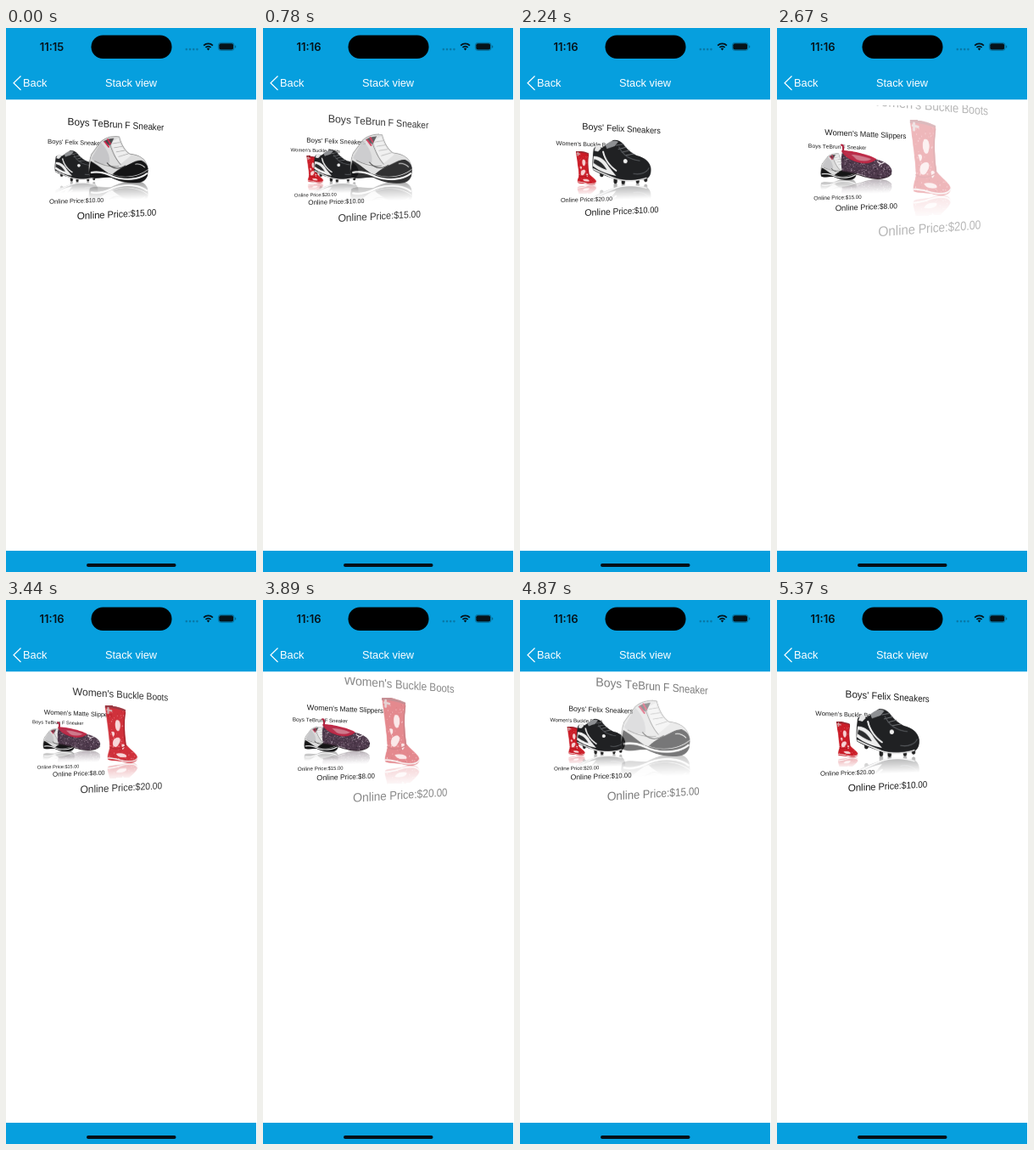
Write an HTML page with a canvas that moves like this. It is 296 px wide and 640 px high and loops after 5.4 s.

```html
<!DOCTYPE html>
<html lang="en">
<head>
<meta charset="utf-8">
<title>Stack view</title>
<style>
  html, body { margin: 0; width: 100%; height: 100%; overflow: hidden; background: #fff; }
  canvas { display: block; width: 296px; height: 640px; }
</style>
</head>
<body>
<canvas id="stage" width="296" height="640"></canvas>
<script>
const W = 296, H = 640, LOOP = 5400;
const BLUE = '#069fde', INK = '#1d1d1d';
const FONT = '"Liberation Sans", Arial, sans-serif';
const ctx = document.getElementById('stage').getContext('2d');

// ---------- product pictures, drawn once on 86-unit squares ----------
const SIZE = 86, RES = 2;

function random(seed) {
  return () => (seed = (seed * 16807) % 2147483647) / 2147483647;
}

function pen(g) {
  return {
    fill(color, d) { g.fillStyle = color; g.fill(new Path2D(d)); },
    line(color, width, d) {
      g.strokeStyle = color; g.lineWidth = width;
      g.lineCap = g.lineJoin = 'round';
      g.stroke(new Path2D(d));
    },
    dots(outline, colors, count, box, seed) {
      const rnd = random(seed);
      g.save();
      g.clip(new Path2D(outline));
      for (let i = 0; i < count; i++) {
        g.fillStyle = colors[i % colors.length];
        g.fillRect(box[0] + rnd() * box[2], box[1] + rnd() * box[3], .5 + rnd(), .5 + rnd());
      }
      g.restore();
    }
  };
}

function drawSlipper({ fill, line, dots }) {
  const body = 'M4 14 C8 20 17 26 31 29 C41 31 50 29 56 24 C67 26 80 31 83 41 C84 49 78 53 68 54 C52 55 40 51 30 47 C20 44 10 45 4 42 C2 34 2 24 4 14Z';
  fill('#b8304d', 'M4 12 C20 12 40 16 57 24 C50 32 38 33 26 30 C14 27 8 21 4 12Z');
  fill('#cf7a8c', 'M18 18 C28 18 40 21 49 24 C43 28 32 28 26 25Z');
  fill('#4b3749', body);
  dots(body, ['#a58da0', '#221a26', '#c9b8c6', '#6d4d66'], 700, [2, 12, 82, 44], 41);
  line('#c02643', 2, 'M4 13 C8 20 17 26 31 29 C42 31 50 29 56 24 C44 18 20 13 4 13');
  line('#b02440', 3, 'M3 4 C6 4 6 9 5 14');
  line('#e9dfe5', 1.6, 'M59 28 L65 31 L70 29 M64 31 L62 34');
  line('#2e2029', 1.4, 'M4 43 C18 44 30 49 42 52 C57 56 75 55 82 47');
}

function drawHighTop({ fill, line }) {
  const body = 'M20 8 C27 2 36 0 44 1 C47 11 51 18 58 22 C69 23 80 26 83 38 C84 47 82 54 74 57 C56 59 44 56 34 51 C24 50 12 54 6 50 C4 42 5 32 8 24Z';
  fill('#dcdcdc', body);
  line('#858585', .7, body);
  fill('#c6c6c8', 'M20 9 C27 16 32 24 31 34 C23 37 13 35 8 29Z');
  fill('#eee', 'M43 3 C46 14 53 21 60 24 L46 35 C39 29 36 18 33 8Z');
  fill('#4a484b', 'M23 8 C28 4 33 4 37 3 L32 13Z');
  line('#d2264a', 2, 'M25 8 L30 14 M29 5 L32 10');
  line('#777', .8, 'M31 10 C35 20 39 29 46 36 M12 32 C24 38 34 39 43 38');
  line('#aaa', .8, 'M35 10 L45 8 M37 15 L48 13 M40 20 L51 18 M43 26 L56 22');
  fill('#151516', 'M35 48 C44 40 52 38 60 34 C66 31 70 30 74 30 C80 32 83 36 84 41 C72 50 52 54 35 48Z');
  line('#d8d8d8', 1, 'M66 35 C72 34 77 37 79 39');
  fill('#151516', 'M5 45 L7 32 C15 36 22 42 30 47 C52 55 72 51 84 42 L83 50 C80 57 74 59 66 59 C50 59 42 56 33 52 C23 51 12 55 6 51Z');
  line('#f3f3f3', 2.2, 'M8 46 C18 44 27 47 36 51 C51 56 71 55 82 47');
  line('#3a3a3a', 1, 'M28 34 C35 42 44 42 52 37');
}

function drawCleat({ fill, line }) {
  const body = 'M2 15 C5 10 9 8 13 13 C18 10 23 5 29 2 C36 1 41 4 45 9 C50 15 56 19 63 22 C73 24 82 29 84 39 C85 48 81 54 74 55 C58 58 44 58 33 55 C22 51 11 48 1 42 C0 33 1 23 2 15Z';
  line('#222', 5, 'M13 46 V49 M32 55 V58 M43 57 V59 M64 57 V58 M76 54 V56');
  fill('#202123', body);
  fill('#8e9093', 'M18 9 C24 4 30 1 36 4 L31 10 L20 14Z');
  fill('#e7e7e7', 'M5 11 C9 8 12 10 12 14 L8 18 L3 17Z');
  fill('#eee', 'M2 24 C11 24 18 29 23 38 L33 50 C22 48 10 44 1 37Z');
  fill('#2a2b2d', 'M3 28 C11 30 15 34 20 42 C13 40 8 37 2 33Z');
  line('#eee', 2.2, 'M15 18 C17 28 24 37 33 43');
  line('#737578', 1, 'M33 9 L42 7 M36 14 L47 11 M41 18 L52 15 M46 22 L58 20');
  line('#55585c', 1.3, 'M37 11 C43 23 54 28 67 29 M58 47 C68 49 78 45 81 39');
  fill('#eee', 'M43 30 a3 3 0 1 0 6 0 a3 3 0 1 0 -6 0');
  line('#f0f0f0', 1.6, 'M2 41 C12 46 22 50 33 54 C47 58 64 57 77 53');
}

function drawBoot({ fill, line, dots }) {
  const body = 'M20 0 C28 -1 38 1 46 4 C44 18 45 32 47 46 C53 53 62 57 62 63 C60 69 51 69 44 67 C37 65 30 66 24 64 C22 60 25 55 26 49 C25 33 22 16 20 0Z';
  fill('#cb1c27', body);
  dots(body, ['#ef8f95', '#a80d18', '#e65a63'], 140, [20, 5, 43, 60], 73);
  fill('#f7d3d4', 'M34 17 C39 15 41 23 38 29 C34 33 31 22 34 17Z M28 31 C33 29 33 35 30 37Z M31 40 C38 34 42 40 37 46 C34 52 27 48 31 40Z M41 46 C46 43 46 51 42 52Z M34 57 C41 55 49 58 47 61 C41 62 36 61 34 57Z');
  fill('#8f2630', 'M20 0 C28 -1 38 1 46 4 L46 6 C36 3 28 2 20 3Z');
  line('#9c0f19', 1.4, 'M45.5 7 C43.5 20 44 34 46 46');
  line('#cfa9ac', 2.4, 'M23 5 L28 6 M24 3 L24 9');
  line('#f2e6e7', 1.4, 'M24 62 C33 62 39 65 46 66 C54 67 60 66 62 62');
  line('#ac101b', 1.1, 'M26 49 C33 53 41 51 47 47');
}

function picture(draw, base) {
  const sheet = () => {
    const c = document.createElement('canvas');
    c.width = c.height = SIZE * RES;
    const g = c.getContext('2d');
    g.scale(RES, RES);
    return [c, g];
  };
  const [shoe, sg] = sheet();
  draw(pen(sg));
  const [out, g] = sheet();
  g.save();
  g.translate(0, base * 2);
  g.scale(1, -1);
  g.drawImage(shoe, 0, 0, SIZE, SIZE);
  g.restore();
  const fade = g.createLinearGradient(0, base - 4, 0, base + 22);
  fade.addColorStop(0, 'rgba(0,0,0,.45)');
  fade.addColorStop(1, 'rgba(0,0,0,0)');
  g.globalCompositeOperation = 'destination-in';
  g.fillStyle = fade;
  g.fillRect(0, 0, SIZE, SIZE);
  g.globalCompositeOperation = 'source-over';
  g.drawImage(shoe, 0, 0, SIZE, SIZE);
  return out;
}

const items = [
  ['Boys TeBrun F Sneaker', '$15.00', picture(drawHighTop, 58)],
  ["Boys' Felix Sneakers", '$10.00', picture(drawCleat, 60)],
  ["Women's Buckle Boots", '$20.00', picture(drawBoot, 68)],
  ["Women's Matte Slippers", '$8.00', picture(drawSlipper, 55)]
].map(([title, price, image]) => ({ title, price: 'Online Price:' + price, image }));

// ---------- perspective: u runs along the card, v down, depth away ----------
const TILT = .00099, SPAN = 1.072, HORIZON = 174, MID = 63.5;

function view(depth) {
  const z0 = 1 + .567 * depth, x0 = 73 - 4 * depth;
  return {
    z: u => z0 + TILT * u,
    x: u => (x0 + SPAN * u) / (z0 + TILT * u),
    u: x => (x * z0 - x0) / (SPAN - TILT * x)
  };
}

function cardText(cam, text, v) {
  ctx.font = '12px ' + FONT;
  ctx.fillStyle = INK;
  ctx.textAlign = 'left';
  let u = MID - ctx.measureText(text).width / 2;
  for (const char of text) {
    const z = cam.z(u), x = cam.x(u), dy = v / z;
    ctx.setTransform((SPAN - TILT * x) / z, -TILT * dy / z, 0, 1 / z, x, HORIZON + dy);
    ctx.fillText(char, 0, 0);
    u += ctx.measureText(char).width;
  }
  ctx.setTransform(1, 0, 0, 1, 0, 0);
}

function cardImage(cam, image) {
  const left = MID - SIZE / 2, top = -50;
  const end = Math.ceil(cam.x(left + SIZE));
  for (let x = Math.floor(cam.x(left)); x < end; x++) {
    const a = Math.max(0, cam.u(x) - left), b = Math.min(SIZE, cam.u(x + 1) - left);
    if (b <= a) continue;
    const z = cam.z(left + (a + b) / 2);
    ctx.drawImage(image, a * RES, 0, (b - a) * RES, SIZE * RES, x, HORIZON + top / z, 1, SIZE / z);
  }
}

function drawCard(item, d) {
  const alpha = Math.min(1, 1 + 1.2 * d);
  if (alpha <= 0) return;
  const cam = view(d < 0 ? d * .88 : d);
  ctx.globalAlpha = alpha;
  cardText(cam, item.title, -60);
  cardImage(cam, item.image);
  cardText(cam, item.price, 51.8);
  ctx.globalAlpha = 1;
}

function drawStack(pos) {
  ctx.save();
  ctx.beginPath();
  ctx.rect(0, 91, W, 523);
  ctx.clip();
  // far to near; cards pop in two places back and fade out past the front
  for (let i = Math.ceil(pos + 2) - 1; i > pos - 1; i--) {
    drawCard(items[((i % 4) + 4) % 4], i - pos);
  }
  ctx.restore();
}

// ---------- scroll position: evenly spaced held steps in each run ----------
const runs = [
  [780, 1310, [.1, .22, .34, .42, -.105, 0]],
  [1410, 1610, [.47, .8, 1]],
  [2240, 2670, [.84, .44, -.1, -.88, -1.43]],
  [2800, 2800, [-1.75]],
  [2990, 2990, [-1.93]],
  [3220, 3220, [-2]],
  [3440, 3890, [-1.92, -1.84, -1.75, -1.66, -1.6]],
  [3990, 4440, [-1.12, -1.02, -.74, -.6, -.455]],
  [4540, 5070, [-.25, -.02, .12, .35, .6, .84]],
  [5170, 5370, [.95, .99, 1]]
];

function position(t) {
  let pos = 0;
  for (const [from, to, steps] of runs) {
    if (t < from) break;
    const n = steps.length - 1;
    pos = steps[to > from ? Math.min(n, Math.floor((t - from) / (to - from) * n + 1e-6)) : 0];
  }
  return pos;
}

// ---------- screen frame ----------
function pill(color, x, y, w, h, r) {
  ctx.fillStyle = color;
  ctx.beginPath();
  ctx.roundRect(x, y, w, h, r);
  ctx.fill();
}

function label(text, x, y, font, color, align) {
  ctx.font = font;
  ctx.fillStyle = color;
  ctx.textAlign = align;
  ctx.fillText(text, x, y);
}

function drawStatus(time) {
  label(time, 54, 26.5, '600 13px Inter, "Open Sans", sans-serif', '#06131a', 'center');
  pill('#000', 100.5, 8.5, 95, 27.5, 13.75);
  for (let i = 0; i < 4; i++) pill('#0879a8', 211.5 + i * 4.2, 23.8, 2.6, 2.6, 1.3);
  ctx.strokeStyle = '#06131a';
  ctx.lineWidth = 1.8;
  for (const r of [4.4, 7.6]) {
    ctx.beginPath();
    ctx.arc(238.5, 26, r, Math.PI * 1.25, Math.PI * 1.75);
    ctx.stroke();
  }
  ctx.fillStyle = '#06131a';
  ctx.beginPath();
  ctx.moveTo(238.5, 26.6);
  ctx.arc(238.5, 26, 2.4, Math.PI * 1.25, Math.PI * 1.75);
  ctx.fill();
  ctx.strokeStyle = '#07678f';
  ctx.lineWidth = .8;
  ctx.beginPath();
  ctx.roundRect(250.4, 17.4, 18.6, 9, 2.8);
  ctx.stroke();
  pill('#06131a', 251.3, 18.3, 16.8, 7.2, 2);
  pill('#07678f', 270, 20.4, 1.2, 3, .6);
}

function drawFrame(t) {
  ctx.fillStyle = '#fff';
  ctx.fillRect(0, 0, W, H);
  drawStack(position(t));
  // the bars leave the last column white
  ctx.fillStyle = BLUE;
  ctx.fillRect(0, 0, W - 1, 84.2);
  ctx.fillRect(0, 615, W - 1, 25);
  drawStatus(t < 460 ? '11:15' : '11:16');
  ctx.strokeStyle = '#fff';
  ctx.lineWidth = 1.2;
  ctx.beginPath();
  ctx.moveTo(17.5, 56.5);
  ctx.lineTo(9, 64.7);
  ctx.lineTo(17.5, 73);
  ctx.stroke();
  label('Back', 20, 69, '12.8px ' + FONT, '#fff', 'left');
  label('Stack view', 147.5, 69, '12.8px ' + FONT, '#fff', 'center');
  pill('#051018', 95, 630, 105.5, 4, 2);
}

ctx.imageSmoothingQuality = 'high';
ctx.fontKerning = 'none';
const begin = performance.now();
function tick() {
  drawFrame((performance.now() - begin) % LOOP);
  requestAnimationFrame(tick);
}
tick();
</script>
</body>
</html>
```
